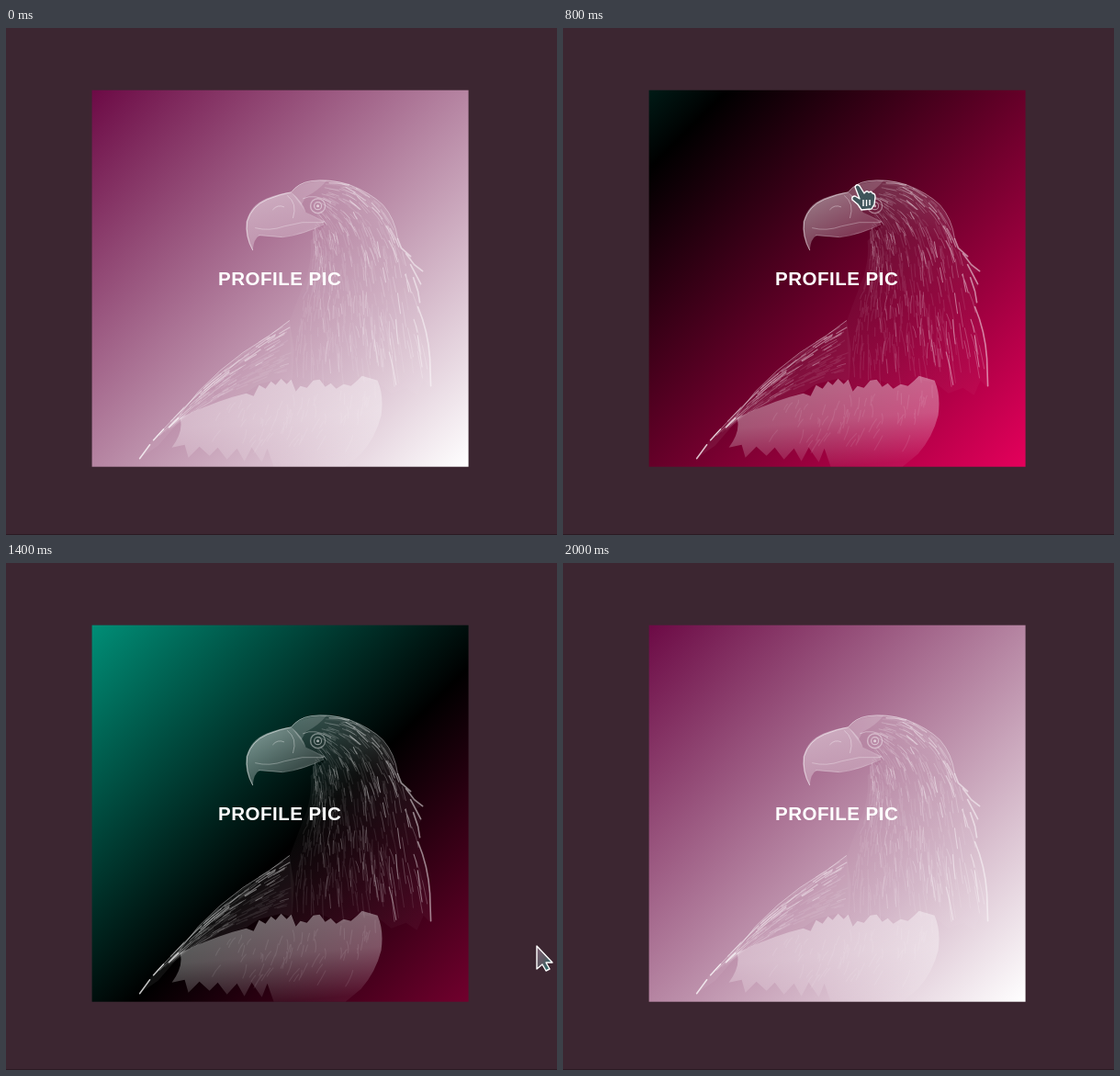
These frames come from a looping animation (600 px wide and 552 px high, 2100 ms). An HTML page:

```html
<!DOCTYPE html>
<html lang="en">
<head>
<meta charset="utf-8">
<title>Profile card</title>
<style>
  html, body { margin: 0; width: 100%; height: 100%; overflow: hidden; background: #3c2631; }
  :root { --t: 0; }
  .card, .cursor, .arrow, .hand {
    animation: 2100ms linear calc(var(--t) * -1ms) infinite paused;
  }
  .stage { position: relative; width: 600px; height: 552px; overflow: hidden; }
  .stage::after { content: ""; position: absolute; left: 0; bottom: 0; width: 600px; height: 1px; background: #2b1a23; }
  .card {
    position: absolute; left: 94px; top: 68px; width: 410px; height: 410px;
    transform: translate(-.4px, -.3px);
    background: linear-gradient(135deg, #6c0a45, #fff, #00ffd5, #000, #ff0066) 0 0 / 400% 400%;
    animation-name: slide;
  }
  .bird { position: absolute; inset: 0; width: 100%; height: 100%; }
  .label {
    position: absolute; inset: 0 1px 0 0; text-align: center; color: #fff;
    font: bold 20.5px/409px "Liberation Sans", Arial, sans-serif; letter-spacing: .5px;
  }
  .cursor { position: absolute; left: 0; top: 0; width: 1px; height: 1px; overflow: visible; animation-name: travel; }
  .arrow { animation-name: outside; }
  .hand { animation-name: inside; }

  @keyframes slide {
    0%, 17.7% { background-position: 0 0; animation-timing-function: ease; }
    44.4% { background-position: 100% 100%; }
    63.1% { background-position: 100% 100%; animation-timing-function: ease; }
    86.9%, 100% { background-position: 0 0; }
  }
  @keyframes travel {
    0%, 4.762% { transform: translate(640px, 425px); }
    9.524% { transform: translate(588px, 382px); }
    14.286% { transform: translate(516px, 322px); }
    19.048% { transform: translate(430px, 254px); }
    23.81% { transform: translate(352px, 194px); }
    28.571%, 52.381% { transform: translate(321px, 171px); }
    57.143% { transform: translate(425px, 275px); }
    61.905% { transform: translate(540px, 384px); }
    66.667% { transform: translate(578px, 416px); }
    71.429% { transform: translate(598px, 432px); }
    76.19%, 100% { transform: translate(640px, 465px); }
  }
  @keyframes outside {
    0%, 16.6% { opacity: 1; }
    16.7%, 59.5% { opacity: 0; }
    59.6%, 100% { opacity: 1; }
  }
  @keyframes inside {
    0%, 16.6% { opacity: 0; fill: #43293c; }
    16.7%, 33% { opacity: 1; fill: #43293c; }
    33.1%, 59.5% { opacity: 1; fill: #3f555a; }
    59.6%, 100% { opacity: 0; fill: #3f555a; }
  }
</style>
</head>
<body>
<div class="stage">
  <div class="card">
    <svg class="bird" viewBox="94 68 410 410" fill="#fff">
      <defs>
        <linearGradient id="fade" gradientUnits="userSpaceOnUse" x1="375" y1="168" x2="360" y2="300">
          <stop offset="0" stop-color="#fff" stop-opacity=".2"/>
          <stop offset=".45" stop-color="#fff" stop-opacity=".06"/>
          <stop offset="1" stop-color="#fff" stop-opacity=".03"/>
        </linearGradient>
        <linearGradient id="horn" gradientUnits="userSpaceOnUse" x1="278" y1="184" x2="300" y2="230">
          <stop offset="0" stop-color="#fff" stop-opacity=".46"/>
          <stop offset="1" stop-color="#fff" stop-opacity=".24"/>
        </linearGradient>
        <linearGradient id="down" gradientUnits="userSpaceOnUse" x1="296" y1="385" x2="304" y2="478">
          <stop offset="0" stop-color="#fff" stop-opacity=".4"/>
          <stop offset=".45" stop-color="#fff" stop-opacity=".33"/>
          <stop offset="1" stop-color="#fff" stop-opacity=".06"/>
        </linearGradient>
      </defs>

      <!-- head and neck -->
      <path fill="url(#fade)" d="M311 179Q318 169 332 167Q352 164 374 170Q396 179 410 192Q424 208 426 224L429 237L440 248L444 258L455 265L448 267L453 280L448 287L451 299L449 304Q460 330 462 360L463 392L455 384L448 400L436 392L420 398L405 386L385 383L366 393L342 382L316 396L312 382L309 320Q318 296 328 270Q334 250 332 232L349 214L327 201Z"/>
      <!-- shoulder and wing -->
      <path opacity=".06" d="M309 318L286 336L258 354L234 373L210 396L190 421L172 436L158 451L147 468L166 455L186 432L206 417L232 407L262 397L276 388L300 382L312 386L314 350Z"/>
      <!-- pale plumage -->
      <path fill="url(#down)" d="M190 425L206 417L232 407L247 402L262 398L270 401L276 389L283 393L289 385L294 389L300 382L306 388L311 383L316 396L321 390L328 392L335 384L342 383L348 391L354 387L360 393L368 388L376 390L383 384L388 379L405 384Q412 400 409 422Q403 446 387 464L370 478H292L285 458L279 473L268 457L260 472L252 458L241 470L231 457L222 466L211 456L199 468L195 454L181 457Q194 440 190 425Z"/>
      <!-- beak -->
      <path fill="url(#horn)" d="M269 243Q260 228 262 211Q267 193 284 186Q299 180 311 179Q324 190 327 201L348 211Q337 219 321 224L300 228L277 226Q270 229 269 243Z"/>
      <path opacity=".16" d="M311 179Q321 167 350 166Q340 178 327 184L322 193Z"/>
      <g fill="none" stroke="#fff" stroke-linecap="round">
        <path opacity=".5" d="M269 242Q261 227 263 211Q268 194 285 187Q300 181 311 179Q319 169 332 167Q352 164 374 171"/>
        <path opacity=".3" d="M272 218Q287 222 304 216L323 212L346 212M276 226L302 228Q325 225 346 214"/>
        <path opacity=".35" d="M307 183Q318 191 313 207M324 186Q336 180 354 190M291 198Q296 192 303 195M374 171Q398 180 411 193Q424 208 427 230"/>
        <circle cx="340" cy="194" r="8" opacity=".4" stroke-width="1.4"/>
        <circle cx="340" cy="194" r="4" opacity=".45" stroke-width="1.2"/>
        <path opacity=".4" d="M309 319L286 336L258 354L234 373L210 396L190 421"/>
        <path opacity=".5" stroke-width="1.6" d="M427 230L431 240L441 249M436 246L445 258L454 265M441 258L452 279M444 272L449 287L451 299M449 304Q460 330 462 360L463 390"/>
        <path opacity=".75" stroke-width="1.5" d="M188 425L178 435M172 437L161 449M157 454L146 469"/>
        <path id="soft" opacity=".09" stroke-width="1.1"/>
        <path id="mid" opacity=".22"/>
        <path id="bright" opacity=".42" stroke-width="1.1"/>
      </g>
      <circle cx="340" cy="194" r="1.5" opacity=".6"/>
    </svg>
    <div class="label">PROFILE PIC</div>
  </div>
  <svg class="cursor" stroke="#fff" stroke-width="1.4" stroke-linejoin="round">
    <defs>
      <linearGradient id="steel" x1="0" y1="0" x2="1" y2="1">
        <stop offset="0" stop-color="#7d6074"/>
        <stop offset=".5" stop-color="#5c5862"/>
        <stop offset="1" stop-color="#18776f"/>
      </linearGradient>
    </defs>
    <path class="arrow" fill="url(#steel)" d="M0 1V26L6 21L10 28L14 26L10 19H17Z"/>
    <g class="hand">
      <path d="M-3 2Q-1 -2 2 1L7 9Q10 5 12 8Q15 6 16 9Q19 9 19 13L18 21L15 26L4 27L0 21L-6 16Q-7 12 -3 12L2 15Z"/>
      <path fill="none" d="M6 16V23M9.5 16V23M13 16V22"/>
    </g>
  </svg>
</div>
<script>
  let seed = 41;
  const rand = () => (seed = (seed * 16807) % 2147483647) / 2147483647;

  const bezier = (p, v) => {
    const w = 1 - v, k = [w * w * w, 3 * w * w * v, 3 * w * v * v, v * v * v];
    return [0, 1].map(axis => k.reduce((sum, c, i) => sum + c * p[i][axis], 0));
  };
  const between = (a, b, u, v) => {
    const p = bezier(a, v), q = bezier(b, v);
    return p.map((c, i) => c + (q[i] - c) * u);
  };
  const at = p => p.map(c => c.toFixed(1)).join(" ");

  const strokes = { soft: "", mid: "", bright: "" };

  // Short strands that follow the flow between two guide curves.
  function plume(a, b, count, length, light) {
    for (let i = 0; i < count; i++) {
      const u = rand(), v = rand() * (1 - length), end = v + length * (0.4 + 0.6 * rand());
      const shine = rand() + light(u, v);
      const tone = shine > 1.05 ? "bright" : shine > 0.6 ? "mid" : "soft";
      const bend = u + (rand() - 0.5) * 0.04;
      strokes[tone] += `M${at(between(a, b, u, v))}Q${at(between(a, b, bend, (v + end) / 2))} ${at(between(a, b, bend, end))}`;
    }
  }

  const throat = [[334, 218], [342, 270], [312, 300], [316, 388]];
  const nape = [[348, 168], [432, 168], [438, 258], [463, 400]];
  const shoulder = [[309, 321], [255, 354], [210, 392], [160, 450]];
  const covert = [[312, 372], [270, 384], [225, 402], [176, 440]];
  const chestLeft = [[225, 407], [218, 420], [212, 440], [200, 464]];
  const chestRight = [[402, 386], [410, 410], [404, 440], [372, 477]];

  // The back of the neck and the crown catch the light.
  plume(throat, nape, 520, 0.1, (u, v) => 0.6 * u * u - 0.25 + 0.3 * Math.max(0, 0.4 - v));
  plume(shoulder, covert, 200, 0.12, u => 0.35 - 0.75 * u);
  plume(chestLeft, chestRight, 70, 0.2, () => -0.5);

  for (const id in strokes) document.getElementById(id).setAttribute("d", strokes[id]);

  // The picture advances in steps of 100 ms.
  function tick(now) {
    document.documentElement.style.setProperty("--t", Math.floor(now / 100) * 100 % 2100);
    requestAnimationFrame(tick);
  }
  requestAnimationFrame(tick);
</script>
</body>
</html>
```
